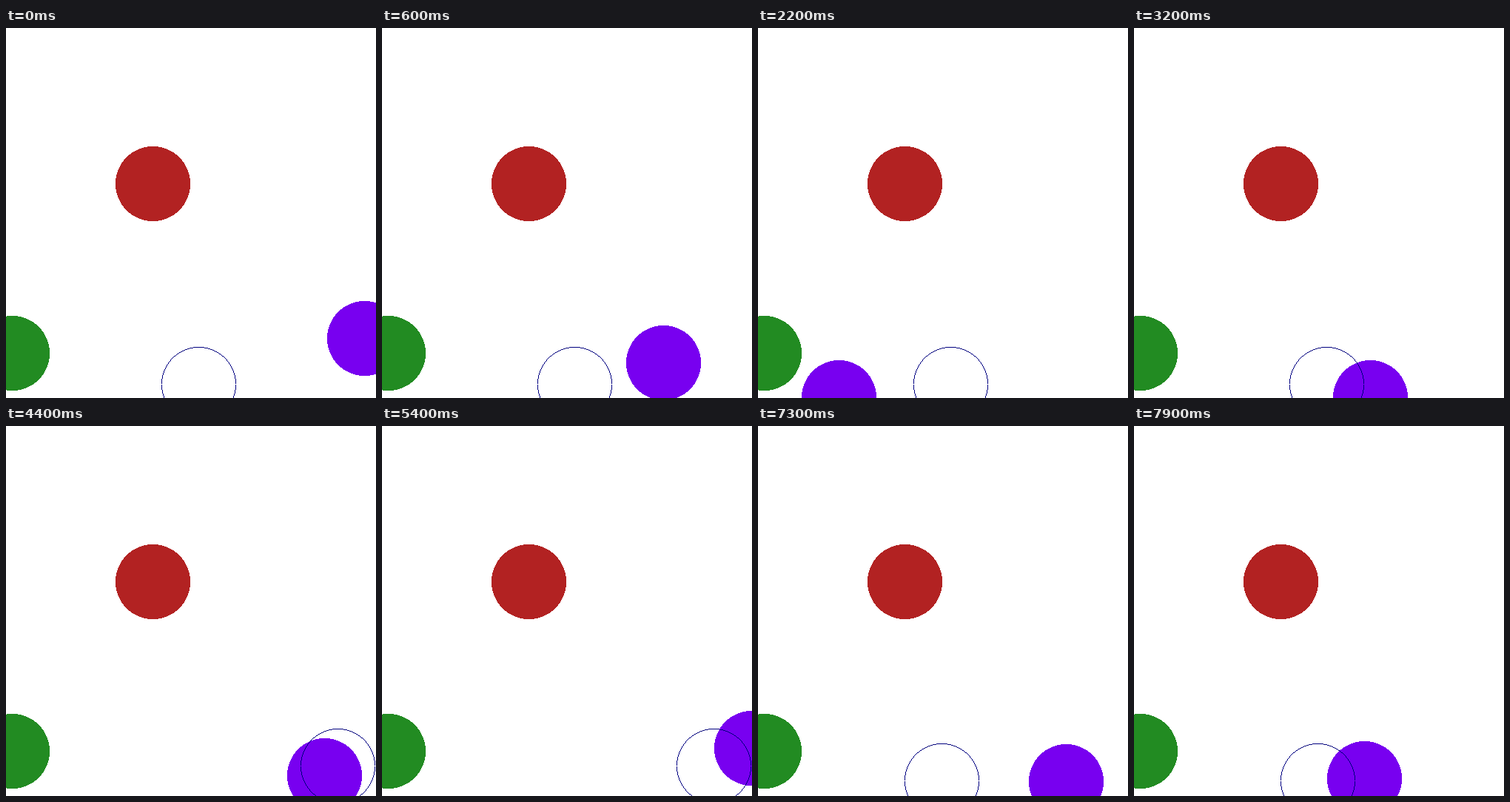
An HTML page with a canvas that plays this animation: 500x500 px, repeating every 8000 ms.

```html
<!DOCTYPE html>
<html lang="en">
<head>
<meta charset="utf-8">
<title>Ball on a spring</title>
<style>
  html, body { margin: 0; width: 100%; height: 100%; overflow: hidden; background: #fff; }
  canvas { display: block; width: 500px; height: 500px; }
</style>
</head>
<body>
<canvas id="stage" width="500" height="500"></canvas>
<script>
const ctx = document.getElementById('stage').getContext('2d');
const SIZE = 500, EDGE = SIZE - 1, R = 50;
const LOOP = 8000, STEP = 100;
const OMEGA = 0.1614, GAMMA = 0.0143; // spring frequency and damping per step

// Damped spring released from rest: 1 at s = 0, settling to 0.
function spring(s) {
  return Math.exp(-GAMMA * s) *
    (Math.cos(OMEGA * s) + GAMMA / OMEGA * Math.sin(OMEGA * s));
}

// The anchor jumps twice; the ball starts each swing from rest
// and is stopped by the right and bottom walls.
function pose(n) {
  if (n < 36) {
    return {
      anchor: [260, 481],
      x: 260 + 224 * Math.exp(-GAMMA * n) * Math.cos(OMEGA * n - 0.0206),
      y: n < 11 ? 490.5 - 71.5 * spring(n + 0.42) : EDGE
    };
  }
  if (n < 72) {
    const s = n - 45.9;
    return {
      anchor: [448, 459],
      x: n < 56.1 ? 448 - 77.4 * spring(n - 35.36) : 448 + 50.8 * spring(n - 56.1),
      y: 462.4 - 32 * Math.exp(-GAMMA * s) * Math.sin(OMEGA * s)
    };
  }
  const s = n - 71.3;
  return {
    anchor: [248, 479],
    x: 248 + 174 * spring(s),
    y: 473.5 + 6.9 * spring(s)
  };
}

// Hard-edged disc, one pixel row at a time.
function disc(x, y, color) {
  ctx.fillStyle = color;
  for (let dy = -R; dy <= R; dy++) {
    const w = Math.floor(Math.sqrt(R * (R + 1) - dy * dy));
    ctx.fillRect(x - w, y + dy, 2 * w + 1, 1);
  }
}

// One-pixel ring, open at the middle of both sides.
function ring(x, y, color) {
  ctx.fillStyle = color;
  for (let i = -35; i <= 35; i++) {
    const j = Math.round(Math.sqrt(R * R - i * i));
    for (const k of [-j, j]) {
      ctx.fillRect(x + i, y + k, 1, 1);
      if (i) ctx.fillRect(x + k, y + i, 1, 1);
    }
  }
}

function draw(n) {
  const p = pose(n);
  const place = v => Math.min(EDGE, Math.round(v));
  ctx.fillStyle = '#fff';
  ctx.fillRect(0, 0, SIZE, SIZE);
  disc(198, 210, '#b22222');
  disc(8, 439, '#228b22');
  disc(place(p.x), place(p.y), '#7800f0');
  ring(...p.anchor, '#000080');
}

const start = performance.now();
function tick() {
  const t = Math.max(0, performance.now() - start) % LOOP;
  draw(Math.floor(t / STEP));
  requestAnimationFrame(tick);
}
tick();
</script>
</body>
</html>
```
